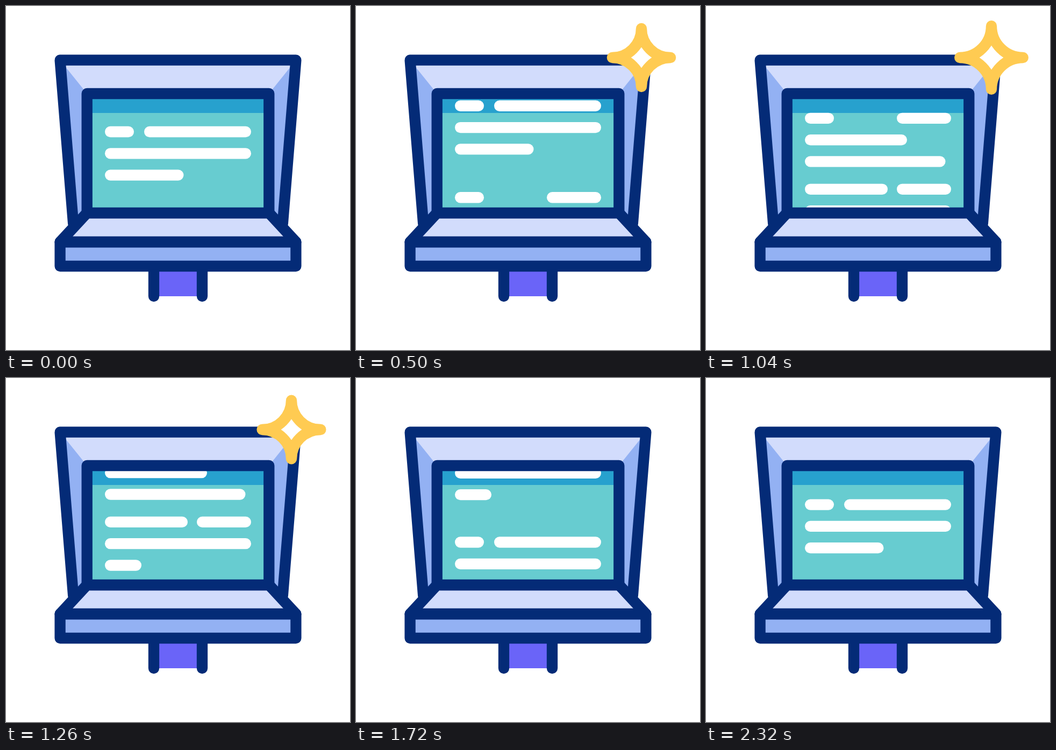
Write an HTML page with a canvas that moves like this. It is 640 px wide and 640 px high and loops after 2400 ms.

```html
<!DOCTYPE html>
<html lang="en">
<head>
<meta charset="utf-8">
<title>Scrolling terminal</title>
<style>
  html, body { margin: 0; width: 100%; height: 100%; overflow: hidden; background: #fff; }
  canvas { display: block; width: 100vw; height: 100vh; object-fit: contain; }
</style>
</head>
<body>
<canvas id="stage" width="640" height="640"></canvas>
<script>
const ctx = document.getElementById('stage').getContext('2d');
const LOOP = 2400, STEP = 20, LINE = 20.3, CENTER = 320;
const NAVY = '#042b77', LIGHT = '#d2dcfc', BLUE = '#93b1f3', TEAL = '#67ccd0',
      BAND = '#27a1ce', VIOLET = '#6a64f8', GOLD = '#ffcb52';

// Half widths and heights of the machine's edges
const OUTER = 219.4, INNER = 169.3, LEG = 45;
const HOOD_TOP = 100.7, SCREEN_TOP = 163, SCREEN_BOTTOM = 385, DESK = 439, DESK_BOTTOM = 484;

// Three paragraphs repeat down the page; the first row also has a right-aligned bar.
const PAGE = { left: 184, right: 456, first: 234, rowGap: 40.3, period: 471.5 };
const PARAGRAPHS = [
  { top: 0, widths: [54, 272, 146.5], aside: 199 },
  { top: 170.5, widths: [54, 190, 261.5], aside: 101 },
  { top: 302.5, widths: [154, 272, 68], aside: 101 }
];
const SCROLL = { distance: 470, duration: 2340 };

const smooth = u => u * u * (3 - 2 * u);

// Cubic Bezier easing with flat ends; x1 and x2 are the handle positions.
function ease(u, x1, x2) {
  if (u >= 1) return 1;
  let lo = 0, hi = 1;
  for (let i = 0; i < 24; i++) {
    const s = (lo + hi) / 2, r = 1 - s;
    if (3 * x1 * s * r * r + 3 * x2 * s * s * r + s * s * s < u) lo = s; else hi = s;
  }
  return smooth(lo);
}

// Symmetric trapezoid from its half widths at the top and bottom
function trapezoid(topHalf, top, bottomHalf, bottom) {
  const path = new Path2D();
  path.moveTo(CENTER - bottomHalf, bottom);
  path.lineTo(CENTER - topHalf, top);
  path.lineTo(CENTER + topHalf, top);
  path.lineTo(CENTER + bottomHalf, bottom);
  path.closePath();
  return path;
}

function fill(path, color) {
  ctx.fillStyle = color;
  ctx.fill(path);
}

function stroke(path, color = NAVY) {
  ctx.strokeStyle = color;
  ctx.stroke(path);
}

function drawBar(x, y, width) {
  ctx.beginPath();
  ctx.roundRect(x, y - LINE / 2, width, LINE, LINE / 2);
  ctx.fill();
}

function drawPage(offset) {
  ctx.save();
  ctx.clip(trapezoid(INNER, SCREEN_TOP, INNER, SCREEN_BOTTOM));
  ctx.fillStyle = '#fff';
  for (const shift of [0, PAGE.period]) {
    for (const { top, widths, aside } of PARAGRAPHS) {
      const y = PAGE.first + shift + top - offset;
      widths.forEach((width, row) => drawBar(PAGE.left, y + row * PAGE.rowGap, width));
      drawBar(PAGE.right - aside, y, aside);
    }
  }
  ctx.restore();
}

function drawMachine(offset) {
  const legs = new Path2D();
  for (const x of [CENTER - LEG, CENTER + LEG]) {
    legs.moveTo(x, DESK_BOTTOM);
    legs.lineTo(x, 540);
  }
  fill(trapezoid(LEG, DESK_BOTTOM, LEG, 540), VIOLET);
  stroke(legs);

  const hood = trapezoid(OUTER, HOOD_TOP, 194.8, 405);
  fill(hood, BLUE);
  fill(trapezoid(OUTER, HOOD_TOP, INNER, SCREEN_TOP), LIGHT);
  stroke(hood);

  const keyboard = trapezoid(INNER, SCREEN_BOTTOM, OUTER, DESK);
  const front = trapezoid(OUTER, DESK, OUTER, DESK_BOTTOM);
  fill(keyboard, LIGHT);
  fill(front, BLUE);
  stroke(keyboard);
  stroke(front);

  const screen = trapezoid(INNER, SCREEN_TOP, INNER, SCREEN_BOTTOM);
  fill(screen, TEAL);
  fill(trapezoid(INNER, SCREEN_TOP, INNER, 199), BAND);
  drawPage(offset);
  stroke(screen);
}

// Grows, pulses down and up, then shrinks, mirrored in time about its middle.
function sparkleRadius(t) {
  const middle = 740, rest = 140, phase = 300, low = 50, high = 66;
  const u = (Math.abs(t - middle) - rest) / phase;
  if (u <= 0) return low;
  if (u < 1) return low + (high - low) * smooth(u);
  return u < 2 ? high * (1 - smooth(u - 1)) : 0;
}

function drawSparkle(r) {
  if (r <= 0) return;
  const star = new Path2D();
  // Four inward quarter circles
  for (let i = 0; i < 4; i++) {
    const a = i * Math.PI / 2, diagonal = a + Math.PI / 4, reach = r * Math.SQRT2;
    star.arc(reach * Math.cos(diagonal), reach * Math.sin(diagonal), r,
             a - Math.PI / 2, a - Math.PI, true);
  }
  star.closePath();
  ctx.save();
  ctx.translate(531, 96);
  fill(star, '#fff');
  stroke(star, GOLD);
  ctx.restore();
}

function draw(now) {
  const t = Math.floor((now % LOOP) / STEP) * STEP;
  ctx.fillStyle = '#fff';
  ctx.fillRect(0, 0, 640, 640);
  ctx.lineWidth = LINE;
  ctx.lineCap = ctx.lineJoin = 'round';
  drawMachine(SCROLL.distance * ease(t / SCROLL.duration, 0.39, 0.597));
  drawSparkle(sparkleRadius(t));
}

const start = performance.now();
function tick() {
  draw(performance.now() - start);
  requestAnimationFrame(tick);
}
tick();
</script>
</body>
</html>
```
